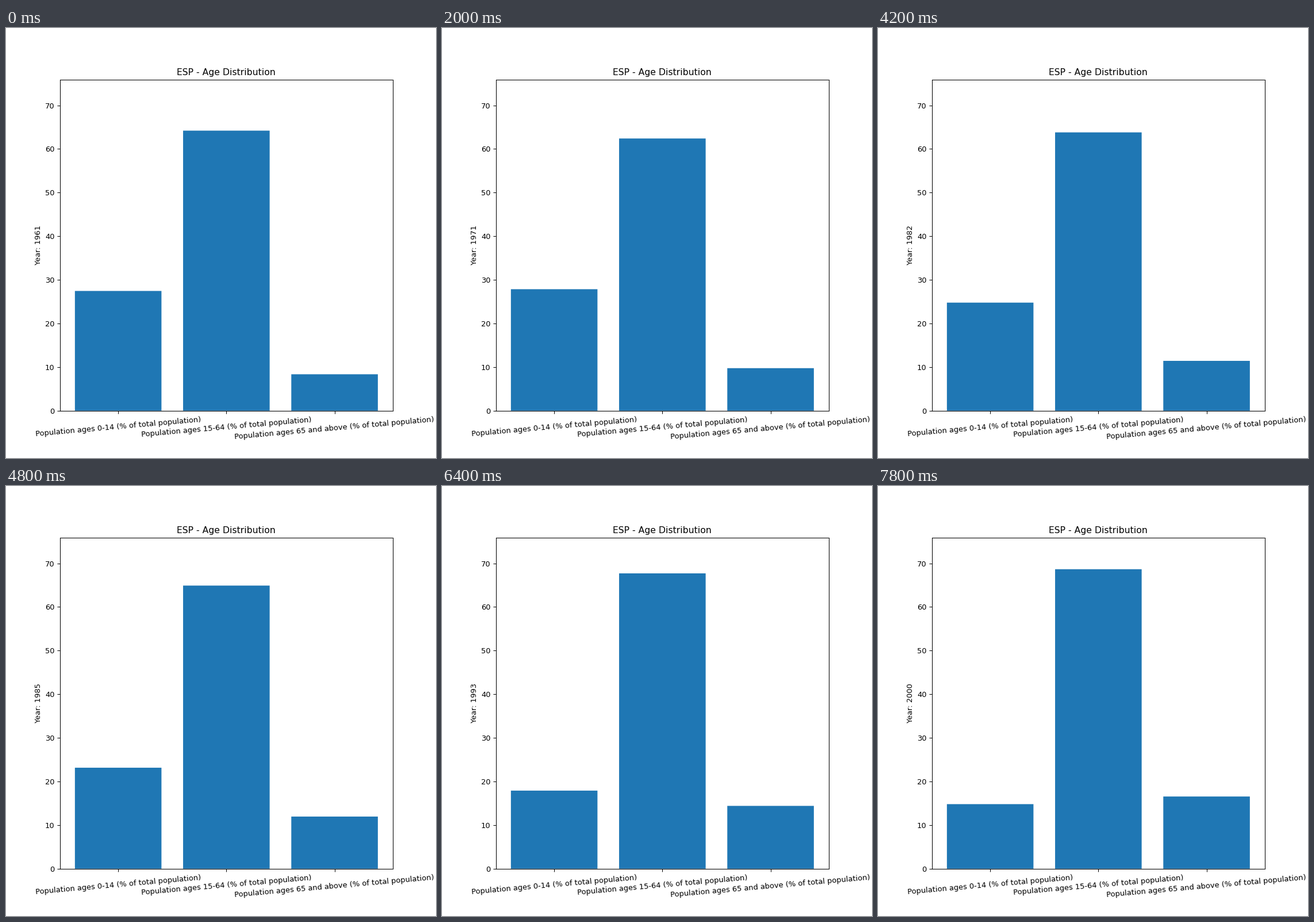
A matplotlib script for the animation above (8000 ms loop, 748x748 px).

```python
import numpy as np
import matplotlib.pyplot as plt
from matplotlib.animation import FuncAnimation

FIRST, LAST = 1961, 2000
GROUPS = ["0-14", "15-64", "65 and above"]

# Turning points of the trend; the middle group is what remains of 100 %.
TURNS = [FIRST, 1971, 1979, 1985, 1993, 1997, LAST]
YOUNG = [27.45, 27.85, 26.4, 23.15, 17.9, 15.65, 14.8]
OLD = [8.35, 9.75, 10.9, 11.95, 14.4, 15.75, 16.55]


def shares(year):
    young = np.interp(year, TURNS, YOUNG)
    old = np.interp(year, TURNS, OLD)
    return young, 100 - young - old, old


fig, ax = plt.subplots(figsize=(8, 8), dpi=93.5)
labels = [f"Population ages {g} (% of total population)" for g in GROUPS]
bars = ax.bar(labels, shares(FIRST), snap=False)
ax.set_ylim(0, 75.9)
ax.set_title("ESP - Age Distribution")
ax.tick_params(axis="x", labelrotation=5)


def update(frame):
    year = FIRST + frame
    for bar, share in zip(bars, shares(year)):
        bar.set_height(share)
    ax.set_ylabel(f"Year: {year}")
    return bars.patches


anim = FuncAnimation(fig, update, frames=LAST - FIRST + 1, interval=200,
                     repeat=True, repeat_delay=0)
plt.show()
```
